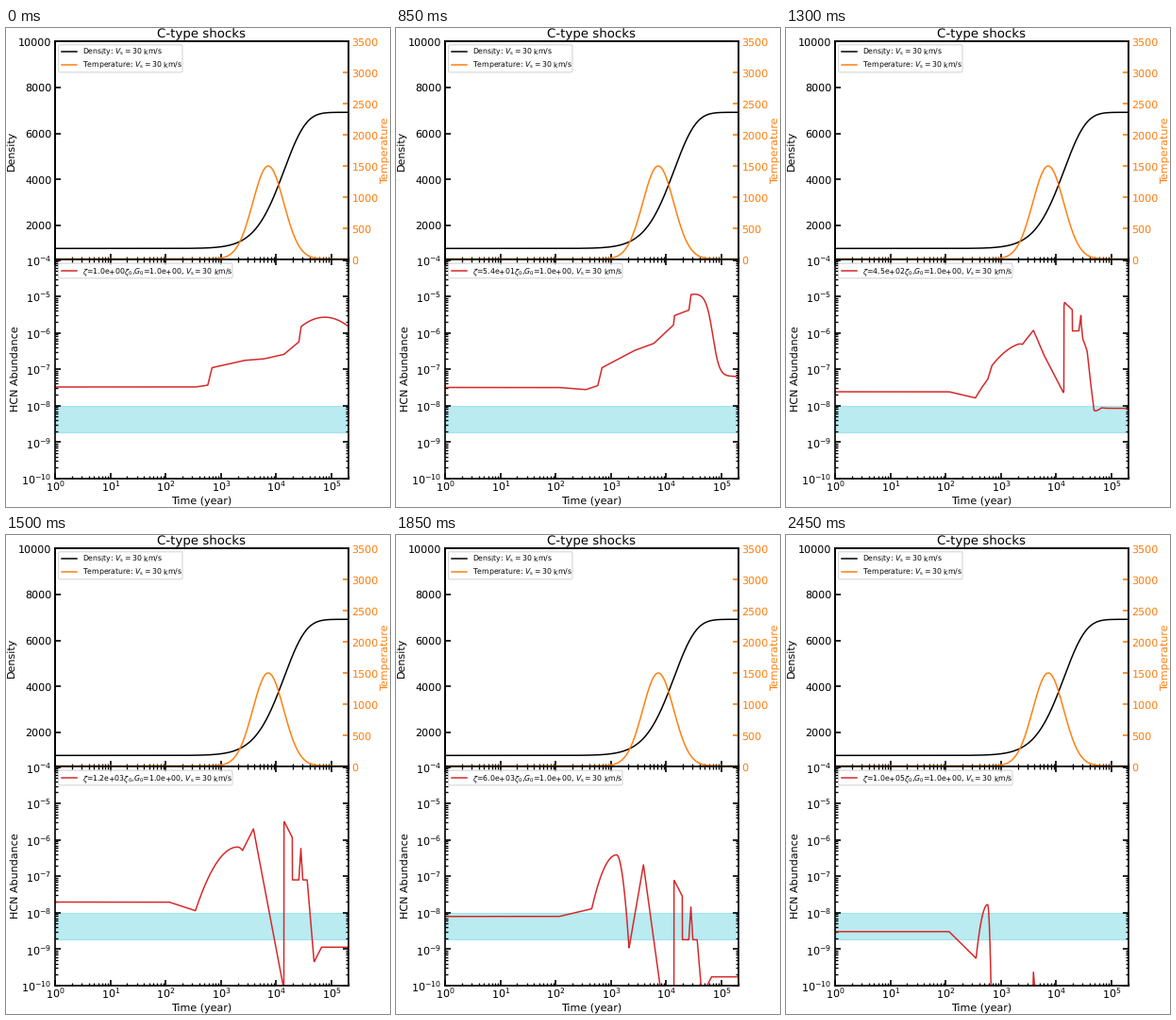
A matplotlib script for the animation above (2.5 s loop, 407 by 507 pixels).

```python
import numpy as np
import matplotlib.pyplot as plt
from matplotlib.animation import FuncAnimation
from matplotlib.patches import FancyBboxPatch

W, H, DPI = 407, 507, 80
FRAMES, STEP = 50, 50
DECADES = 5
LOG_END = np.log10(2e5)
CALM, HARSH = 2.245, 3.06   # log ionisation where one regime hands over
SHOCK = r"$V_{\rm s} = 30$ km/s"
ORANGE, RED = "tab:orange", "tab:red"

plt.rcParams.update({
    "font.family": "DejaVu Sans", "font.size": 10, "text.hinting": "none",
    "axes.linewidth": 1.5, "lines.linewidth": 1.35,
    "xtick.direction": "in", "ytick.direction": "in",
    "xtick.top": True, "ytick.right": True, "xtick.major.pad": 0.7,
    "xtick.major.size": 5, "ytick.major.size": 5,
    "xtick.minor.size": 3, "ytick.minor.size": 3,
    "xtick.major.width": 1.5, "ytick.major.width": 1.5,
    "xtick.minor.width": 1.2, "ytick.minor.width": 1.2,
})

x = np.linspace(0, LOG_END, 1600)   # log time


def plateau(s):
    return -7.49 - 1.08 / (1 + np.exp(-2.3 * (s - 3.65)))


def calm(s):
    """Log abundance at low ionisation: a climb with two jumps, then a decay."""
    q = s * s
    start = plateau(s)
    crest = -5.83 + 0.7 * s - 0.11 * q
    climb = np.interp(
        x,
        [2.06, 2.54, 2.76, 2.836, 3.42, 3.77, 4.13, 4.15, 4.41, 4.45],
        [start, start - 0.02 * q, start + 0.05, -6.96, -6.76 + 0.09 * q,
         -6.72 + 0.14 * q, -6.6 + 0.27 * q, -6.58 + 0.35 * q,
         -6.25 + 0.29 * q, crest])
    v = x - 4.45
    decay = crest + (1.2 - 0.3 * q) * v - 1.4 * v**2
    onset = 4.16 + 2.07 / max(s, 0.1) ** 2
    k = 0.5 + 0.5 * np.tanh((x - onset) / 0.12)
    return np.where(v < 0, climb, decay + (-7.2 - decay) * k)


def hill(center, height, left, right, power=1):
    """Peak with separate steepness on each side."""
    u = x - center
    return height - np.where(u < 0, left, right) * abs(u) ** power


def harsh(s):
    """Log abundance at high ionisation: the highest of several peaks."""
    d = s - HARSH
    first = 3.3 - 0.28 * d
    slope = 0.5 - 2.2 * d + 1.4 * d**2
    pieces = [
        # (from, to, curve)
        (0, first, plateau(s) - slope * np.maximum(x - 2.06, 0)),
        (0, 4.14, hill(first, -6.2 - 0.42 * d**2,
                       3 * np.exp(1.25 * d), 12 * np.exp(2 * d), 2)),
        (0, 4.14, hill(3.587, -5.7 - d - 0.53 * d**2,
                       3 * np.exp(1.5 * d), 8 * np.exp(0.45 * d))),
        (4.14, 4.29, hill(4.145, -5.5 - 1.9 * d - 0.5 * d**2, 3, 3)),
        (4.29, 6, hill(4.445, -6.22 - 2.25 * d, 25, 25)),
        (4.29, 6, hill(4.56, -7.1 - 2.3 * d, 0, 18)),
        (4.5, 6, hill(4.82, -8.95 - 1.14 * d, 3, 0)),
    ]
    return np.max([np.where((x >= a) & (x < b), y, -13)
                   for a, b, y in pieces], axis=0)


def log_zeta(i):
    return DECADES * i / (FRAMES - 1)


def abundance(i):
    s = log_zeta(i)
    w = np.clip((s - CALM) / (HARSH - CALM), 0, 1)
    return 10 ** ((1 - w) * calm(min(s, CALM)) + w * harsh(max(s, HARSH)))


def label(i):
    return (rf"$\zeta$={10 ** log_zeta(i):.1e}$\zeta_0$,"
            rf"$G_0$=1.0e+00, {SHOCK}")


def panel(top, bottom):
    left, right = 52.3, 362.6
    ax = fig.add_axes([left / W, 1 - bottom / H,
                       (right - left) / W, (bottom - top) / H])
    ax.set_xscale("log")
    ax.set_xlim(1, 2e5)
    return ax


def key_box(top, right, bottom):
    page.add_patch(FancyBboxPatch(
        (55.6, top), right - 55.6, bottom - top,
        boxstyle="round,pad=0,rounding_size=1.5",
        fc="white", ec="0.8", lw=1, alpha=0.8))


def key_row(y, color, text):
    page.plot([59, 74.6], [y, y], color=color)
    return page.text(80.8, y + 2.9, text, fontsize=7, va="baseline")


def axis_label(px, py, text, rotation=0, color="black"):
    page.text(px, py, text, rotation=rotation, color=color,
              ha="center", va="center")


fig = plt.figure(figsize=(W / DPI, H / DPI), dpi=DPI, facecolor="white")
upper = panel(14.3, 245.5)
heat = upper.twinx()
lower = panel(245.5, 476.7)

# Shock structure
u = 2.93 * (x - 4.061)
density = 1000 + 5920 * (1 - np.exp(-np.exp(-0.404 + 1.05 * u - 0.075 * u**2)))
temperature = 16 + 1490 * np.exp(-0.5 * ((x - 3.855) / 0.28) ** 2)

upper.plot(10**x, density, "k")
upper.set_ylim(500, 10000)
upper.set_title("C-type shocks", pad=4)
upper.tick_params(axis="x", which="both", top=False, labelbottom=False)
heat.plot(10**x, temperature, color=ORANGE)
heat.set_ylim(0, 3500)
heat.tick_params(axis="y", colors=ORANGE)

# Abundance
lower.set_yscale("log")
lower.set_ylim(1e-10, 1e-4)
lower.axhspan(1.8e-9, 9.5e-9, color="tab:cyan", alpha=0.3)
hcn_line, = lower.plot(10**x, abundance(0), color=RED)

# Labels and keys, placed in page pixels
page = fig.add_axes([0, 0, 1, 1])
page.set_xlim(0, W)
page.set_ylim(H, 0)
page.axis("off")
axis_label(6, 130, "Density", 90)
axis_label(401.3, 130, "Temperature", 90, ORANGE)
axis_label(9.6, 361, "HCN Abundance", 90)
axis_label(207.5, 500.7, "Time (year)")
key_box(17.8, 187, 46.8)
key_row(24.9, "black", "Density: " + SHOCK)
key_row(38.7, ORANGE, "Temperature: " + SHOCK)
key_box(249.2, 240, 264.8)
caption = key_row(257, RED, label(0))


def draw(i):
    hcn_line.set_ydata(abundance(i))
    caption.set_text(label(i))
    return hcn_line, caption


anim = FuncAnimation(fig, draw, frames=FRAMES, interval=STEP,
                     repeat=True, repeat_delay=0)
plt.show()
```
